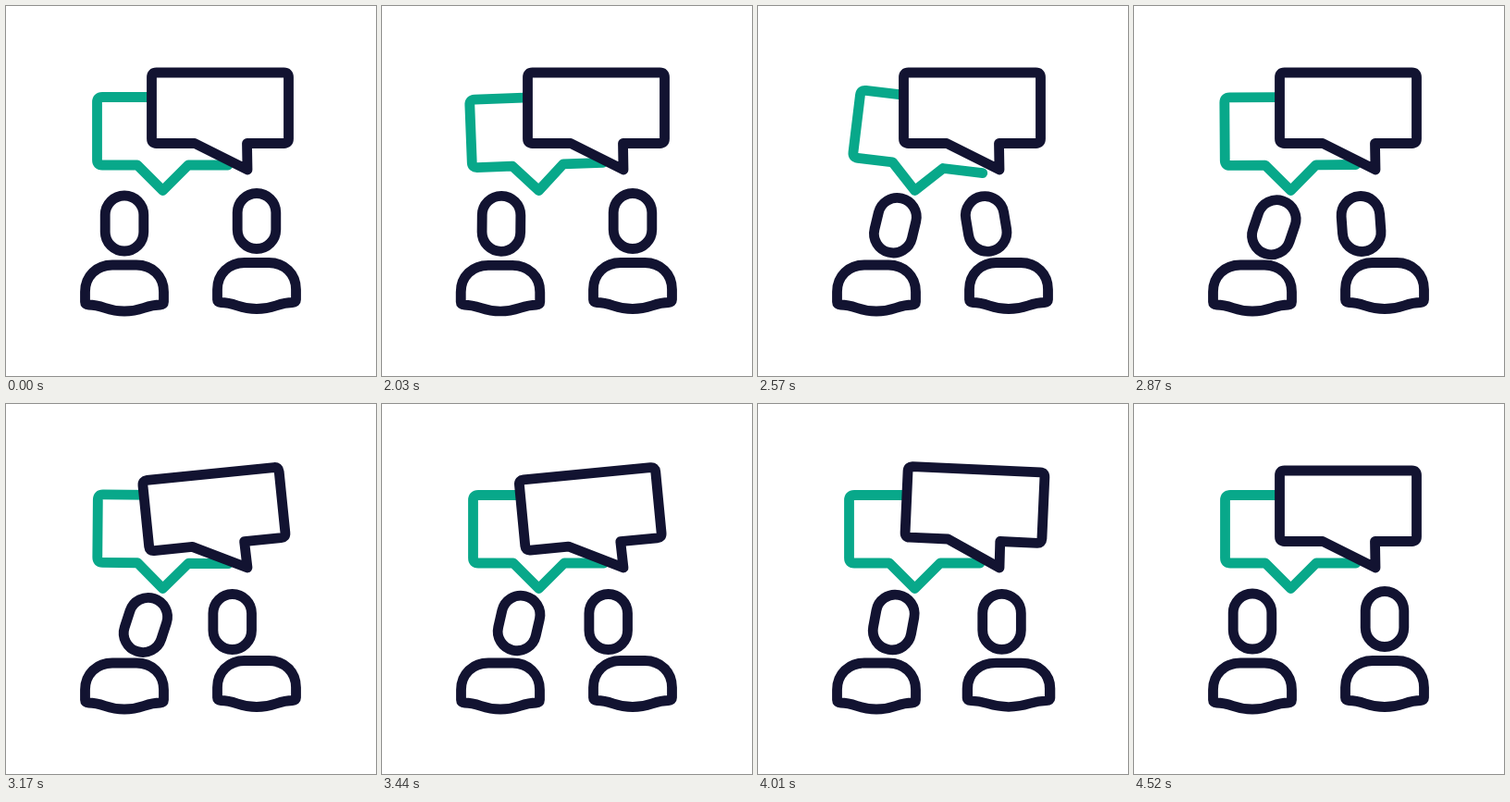
Animation, 400 px wide and 400 px high, one loop 4.55 s. Source, as an HTML page:

```html
<!DOCTYPE html>
<html lang="en">
<head>
<meta charset="utf-8">
<title>Conversation</title>
<style>
  html, body { margin: 0; width: 100%; height: 100%; overflow: hidden; background: #fff; }
  svg { display: block; width: 100%; height: 100%; }
  .line { fill: none; stroke: #121331; stroke-width: 10.8; stroke-linecap: round; stroke-linejoin: round; }
  #greenBubble { stroke: #08a88a; }
  #darkBubble { fill: #fff; }
</style>
</head>
<body>
<svg viewBox="0 0 400 400">
  <defs>
    <rect id="head" x="-20.8" y="-30" width="41.6" height="60" rx="20.8"/>
    <path id="body" d="M-42.5 -10V-21C-42.5 -38 -30 -50 -13 -50H13C30 -50 42.5 -38 42.5 -21V-10
      Q42.5 -7 39 -7C22 -7 20 0 0 0C-20 0 -22 -7 -39 -7Q-42.5 -7 -42.5 -10Z"/>
  </defs>
  <path id="greenBubble" class="line" d="M157 98.5h-53q-5.5 0 -5.5 5.5v62.5q0 5.5 5.5 5.5H142l27.5 27.5L197 172h43"/>
  <path id="darkBubble" class="line" d="M162.5 72h138q5 0 5 5v66.5q0 5 -5 5h-40L261 177L204 148.500h-41.5q-5 0 -5 -5V77q0 -5 5 -5Z"/>
  <use id="leftBody" href="#body" class="line"/>
  <use id="rightBody" href="#body" class="line"/>
  <use id="leftHead" href="#head" class="line"/>
  <use id="rightHead" href="#head" class="line"/>
</svg>
<script>
  const LOOP = 4550;
  const SWING_STEP = 249, SWINGS = 5;

  const place = (id, transform) => document.getElementById(id).setAttribute('transform', transform);
  const progress = (t, start, length) => Math.min(1, Math.max(0, (t - start) / length));
  const ease = (t, start, length) => (1 - Math.cos(Math.PI * progress(t, start, length))) / 2;
  const bump = (t, start, length) => Math.sin(Math.PI * progress(t, start, length)) ** 2;

  // Alternating turning points that shrink evenly to rest
  const peak = n => n > 0 && n < SWINGS ? (-1) ** n * 5 * (SWINGS - n) : 0;

  function swing(t, start) {
    const n = Math.floor((t - start) / SWING_STEP);
    return peak(n) + (peak(n + 1) - peak(n)) * ease(t, start + n * SWING_STEP, SWING_STEP);
  }

  // A person leans towards the other, sways while listening, then sits back
  function person(side, t, p) {
    const lean = ease(t, p.leanAt, 315) - ease(t, p.backAt, p.backTime);
    const squash = bump(t, p.leanAt + 10, 320) + bump(t, p.backAt, 320);
    const sway = bump(t, p.swayAt, p.swayTime);
    const x = p.x + p.leanX * lean + p.swayX * sway;
    const y = p.y - 95 + p.leanY * lean + 2 * squash + p.swayY * sway;
    place(side + 'Head', `translate(${x} ${y}) rotate(${p.tilt * lean + p.swayTilt * sway})`);
    place(side + 'Body', `translate(${p.x} ${p.y}) scale(${1 + 0.05 * squash} ${1 - 0.05 * squash})`);
  }

  const left = {
    x: 128, y: 330, leanAt: 1985, backAt: 4110, backTime: 320,
    leanX: 18.7, leanY: 1, tilt: 10.5,
    swayAt: 2300, swayTime: 1380, swayX: 5, swayY: 3.5, swayTilt: 9
  };
  const right = {
    x: 271, y: 327.5, leanAt: 2030, backAt: 3860, backTime: 235,
    leanX: -26.3, leanY: 3, tilt: 0,
    swayAt: 2100, swayTime: 1000, swayX: 2, swayY: 0, swayTilt: -9.5
  };

  function frame(now) {
    const t = now % LOOP;
    place('greenBubble', `rotate(${swing(t, 1977)} 169.5 199.5)`);
    place('darkBubble', `rotate(${swing(t, 3081)} 261 177)`);
    person('left', t, left);
    person('right', t, right);
    requestAnimationFrame(frame);
  }
  frame(0);
</script>
</body>
</html>
```
